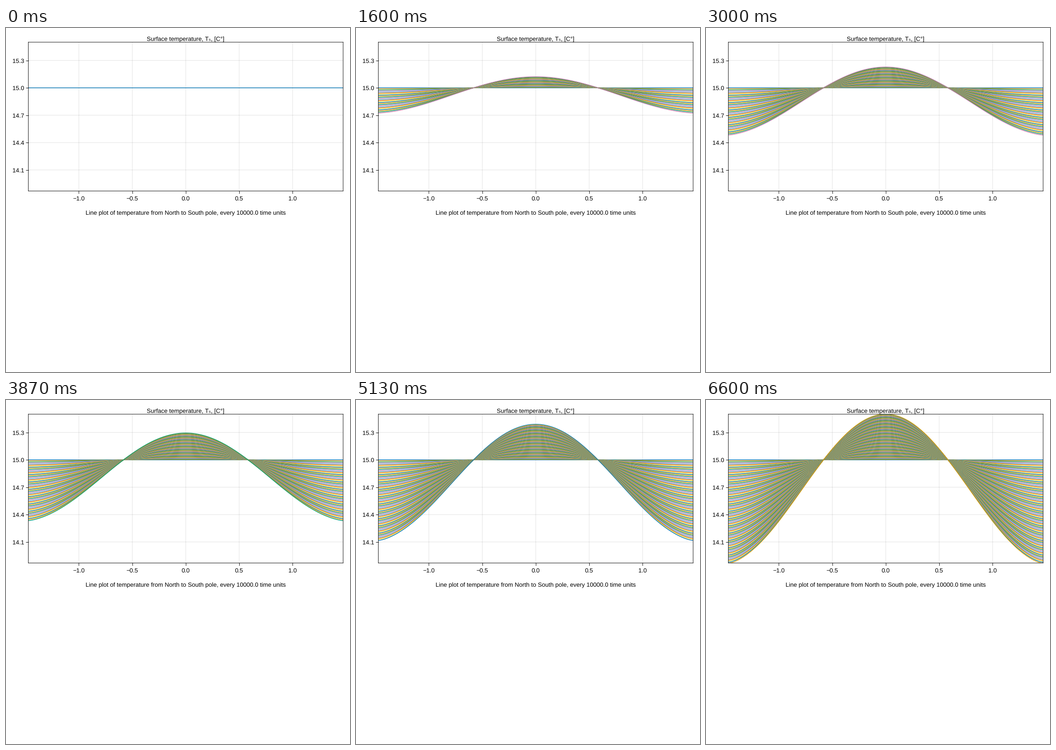
Recreate the animation shown at these times as a matplotlib script. Size 748 by 748 pixels, loop 6.67 s.

```python
import numpy as np
import matplotlib.pyplot as plt
from matplotlib.animation import FuncAnimation
from matplotlib.collections import LineCollection

SIZE, DPI = 748, 64
PT = 72 / DPI              # points per pixel
UNIT = 0.935               # layout unit in pixels
CURVES = 100
FRAMES, STEP = 290, 23     # 6670 ms per loop

plt.rcParams["font.family"] = ["Liberation Sans", "DejaVu Sans"]
plt.rcParams["text.hinting"] = "none"
plt.rcParams["path.simplify"] = False
plt.rcParams["path.snap"] = False

LEFT, RIGHT, TOP, BOTTOM = 48.62, 733.04, 30.86, 354.4
X_MAX = np.pi / 2 * 15 / 16
Y_MIN, Y_MAX = 13.8697, 15.5005
COLORS = ["#0072B2", "#E69F00", "#009E73", "#CC79A7",
          "#56B4E9", "#D55E00", "#F0E442"]

fig = plt.figure(figsize=(SIZE / DPI, SIZE / DPI), dpi=DPI, facecolor="white")
ax = fig.add_axes([LEFT / SIZE, 1 - BOTTOM / SIZE,
                   (RIGHT - LEFT) / SIZE, (BOTTOM - TOP) / SIZE])
ax.set_xlim(-X_MAX, X_MAX)
ax.set_ylim(Y_MIN, Y_MAX)
ax.set_axisbelow(True)


def label(x, y, text, ha="center"):
    fig.text(x / SIZE, 1 - y / SIZE, text, ha=ha, va="baseline",
             fontsize=14 * UNIT * PT, color="black")


def px(x):
    return LEFT + (x + X_MAX) / (2 * X_MAX) * (RIGHT - LEFT)


def py(y):
    return BOTTOM - (y - Y_MIN) / (Y_MAX - Y_MIN) * (BOTTOM - TOP)


x_ticks = [-1.0, -0.5, 0.0, 0.5, 1.0]
y_ticks = [14.1, 14.4, 14.7, 15.0, 15.3]
ax.set_xticks(x_ticks, labels=[""] * len(x_ticks))
ax.set_yticks(y_ticks, labels=[""] * len(y_ticks))
ax.tick_params(length=6 * UNIT * PT, width=UNIT * PT, color="black")
ax.grid(color="black", alpha=0.12, linewidth=UNIT * PT)
for spine in ax.spines.values():
    spine.set_linewidth(UNIT * PT)
    spine.set_zorder(10)

for x in x_ticks:
    label(px(x), 375.0, f"{x:.1f}".replace("-", "\u2212"))
for y in y_ticks:
    label(39.2, py(y) + 4.9, f"{y:.1f}", ha="right")

mid = (LEFT + RIGHT) / 2
label(mid, 27.8, "Surface temperature, T\u209b, [C\u00b0]")
label(mid, 406.0, "Line plot of temperature from North to South pole, "
                  "every 10000.0 time units")


def simulate():
    """Sunlight-driven heating with slow diffusion and closed ends."""
    lat = np.linspace(-X_MAX, X_MAX, 241)
    heating = 0.016805 * (np.cos(lat) ** 2 - 0.697)
    temp = np.full_like(lat, 15.0)
    curves = []
    for _ in range(CURVES):
        curves.append(np.column_stack([lat, temp]))
        spread = np.diff(np.pad(temp, 1, mode="edge"), 2)
        temp = temp + heating + 0.124 * spread
    return curves


curves = simulate()
lines = LineCollection([], linewidths=1.5 * UNIT * PT, zorder=3,
                       colors=[COLORS[n % len(COLORS)] for n in range(CURVES)])
ax.add_collection(lines, autolim=False)


def update(frame):
    # 15 curves per second, each appearing on a 10 ms tick
    tick = (frame * STEP + STEP - 1) // 10
    newest = min((10 * tick + 5) * 3 // 200, CURVES - 1)
    lines.set_segments(curves[:newest + 1])
    return [lines]


anim = FuncAnimation(fig, update, frames=FRAMES, interval=STEP,
                     repeat=True, repeat_delay=0, blit=False)
plt.show()
```
